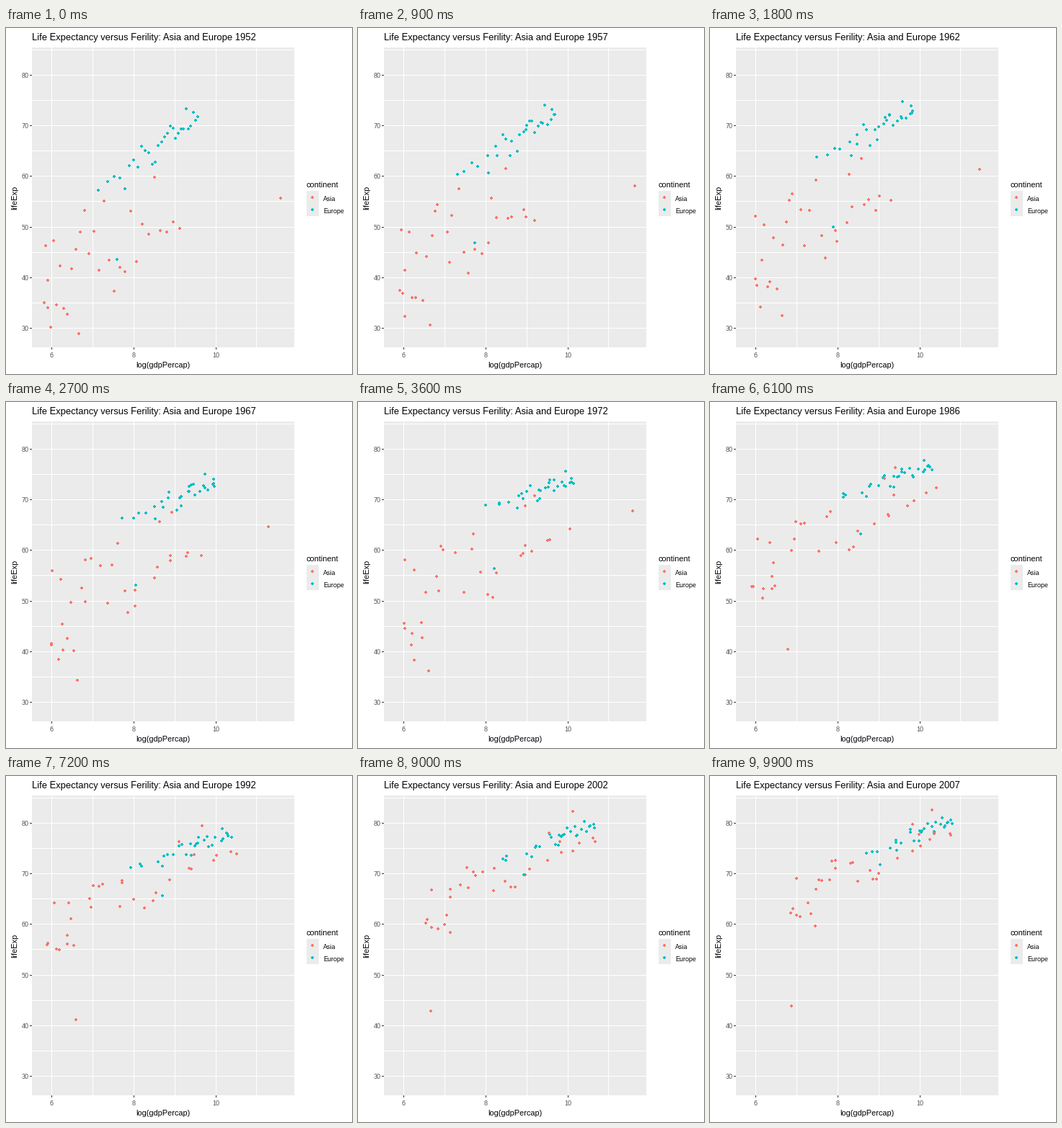
These frames come from a looping animation (480 by 480 pixels, 10000 ms). A matplotlib script:

```python
import numpy as np
import matplotlib.pyplot as plt
from matplotlib.animation import FuncAnimation
from matplotlib.patches import Rectangle

plt.rcParams["font.family"] = "Liberation Sans"
plt.rcParams["text.hinting"] = "native"

SIZE, FRAMES = 480, 100
ASIA, EUROPE = "#F8766D", "#00BFC4"
PANEL, TICK, LABEL = "#EBEBEB", "#333333", "#4D4D4D"
YEARS = np.linspace(1952, 2007, FRAMES)
TREND = (1952, 1962, 1972, 1992, 2007)
SURVEYS = np.arange(1952, 2008, 5)

rng = np.random.default_rng(12)


def px(log_gdp):
    return np.round(35.65 + (np.asarray(log_gdp) - 5.510) * 56.78)


def py(life):
    return np.round(443.3 - (np.asarray(life) - 26.111) * 7.02)


def trend(values):
    return np.interp(YEARS, TREND, values)


def drift(n):
    """Random walks from zero that turn at every survey year."""
    steps = rng.normal(size=(n, len(SURVEYS)))
    walks = np.cumsum(steps, axis=1) - steps[:, :1]
    return np.array([np.interp(YEARS, SURVEYS, w) for w in walks])


def cloud(n, skew, gdp_low, gdp_high, life_low, life_high, spread):
    """Dots strewn along a line whose two ends follow the trend."""
    rank = ((np.arange(n) + 0.5) / n)[:, None]
    rank = np.clip(rank + 0.015 * drift(n), 0, 1) ** skew
    off = rng.uniform(-1.6, 1.6, (n, 1)) + 0.12 * drift(n)
    gdp = trend(gdp_low) + rank * (trend(gdp_high) - trend(gdp_low))
    life = trend(life_low) + rank * (trend(life_high) - trend(life_low))
    return gdp, np.minimum(life + off * trend(spread), 82.6)


def path(*points):
    """One outlier moving straight between (year, log gdp, life) points."""
    years, gdp, life = zip(*points)
    return np.interp(YEARS, years, gdp)[None], np.interp(YEARS, years, life)[None]


groups = [
    (ASIA, cloud(30, 1.4,
                 (5.8, 5.95, 5.9, 5.85, 6.85), (9.2, 9.45, 10.1, 10.45, 10.75),
                 (38, 43, 48, 58, 64), (57, 63, 69, 78, 81), (7, 6.5, 5.5, 3.5, 3))),
    (EUROPE, cloud(29, 0.6,
                   (6.9, 7.45, 8, 7.85, 8.7), (9.6, 9.9, 10.2, 10.4, 10.8),
                   (54, 62, 67.5, 70, 73), (73, 74, 74.5, 78.5, 81), (1.8, 1.5, 1.2, 1.1, 1))),
    (ASIA, path((1952, 11.59, 55.6), (1957, 11.64, 58), (1967, 11.30, 64.6),
                (1972, 11.60, 67.7), (1982, 10.35, 71.3), (2007, 10.76, 77.6))),
    (ASIA, path((1952, 5.91, 39.4), (1967, 6.26, 45.4), (1977, 6.26, 31.2),
                (1982, 6.44, 51), (1992, 6.53, 55.8), (2007, 7.45, 59.7))),
    (ASIA, path((1952, 6.66, 28.8), (1972, 6.61, 36.1), (1982, 6.89, 39.9),
                (1997, 6.45, 41.8), (2007, 6.88, 43.8))),
    (EUROPE, path((1952, 7.59, 43.6), (1977, 8.36, 59.5), (2007, 9.04, 71.8))),
]
colors = np.concatenate([[c] * len(gdp) for c, (gdp, _) in groups])
xs = px(np.vstack([gdp for _, (gdp, _) in groups]))
ys = py(np.vstack([life for _, (_, life) in groups]))

order = rng.permutation(len(colors))
colors, xs, ys = colors[order], xs[order], ys[order]

fig = plt.figure(figsize=(SIZE / 72, SIZE / 72), dpi=72, facecolor="white")
ax = fig.add_axes([0, 0, 1, 1])
ax.set(xlim=(0, SIZE), ylim=(SIZE, 0))
ax.axis("off")

# Four-pixel dot without its corner pixels
corner = np.array([(2, -1), (2, 1), (1, 1)])
turn = np.array([(0, 1), (-1, 0)])
DOT = np.vstack([corner @ np.linalg.matrix_power(turn, k) for k in range(4)])


def box(x0, y0, x1, y1, color):
    ax.add_patch(Rectangle((x0, y0), x1 - x0, y1 - y0, fc=color, lw=0, antialiased=False))


def text(x, y, s, size, color="black", **kw):
    return ax.text(x, y, s, size=size, color=color, va="baseline", **kw)


def dots(x, y, color, z):
    return ax.scatter(x, y, s=16, c=color, marker=DOT, linewidths=0,
                      antialiased=False, zorder=z)


box(36, 27, 400, 443, PANEL)
for life in range(30, 90, 5):
    y = py(life)
    box(36, y, 400, y + 1, "white")
    if life % 10 == 0:
        box(33, y, 36, y + 1, TICK)
        text(31.3, y + 4, str(life), 9, LABEL, ha="right")
for log_gdp in range(6, 12):
    x = px(log_gdp)
    box(x, 27, x + 1, 443, "white")
    if log_gdp % 2 == 0:
        box(x, 443, x + 1, 446, TICK)
        text(x, 457, str(log_gdp), 9, LABEL, ha="center")

text(218, 471, "log(gdpPercap)", 11, ha="center")
text(15, 235, "lifeExp", 11, rotation=90, rotation_mode="anchor", ha="center")

text(417, 221, "continent", 11)
box(417, 226, 434, 261, PANEL)
text(440, 240, "Asia", 9)
text(440, 257, "Europe", 9)
dots([425, 425], [235, 252], [ASIA, EUROPE], 3)

title = text(36, 17, "", 13.05)
points = dots(xs[:, 0], ys[:, 0], colors, 4)


def draw(i):
    points.set_offsets(np.column_stack((xs[:, i], ys[:, i])))
    title.set_text(f"Life Expectancy versus Ferility: Asia and Europe {round(YEARS[i])}")
    return points, title


anim = FuncAnimation(fig, draw, frames=FRAMES, interval=1000 / 10, repeat=True, repeat_delay=0)
plt.show()
```
